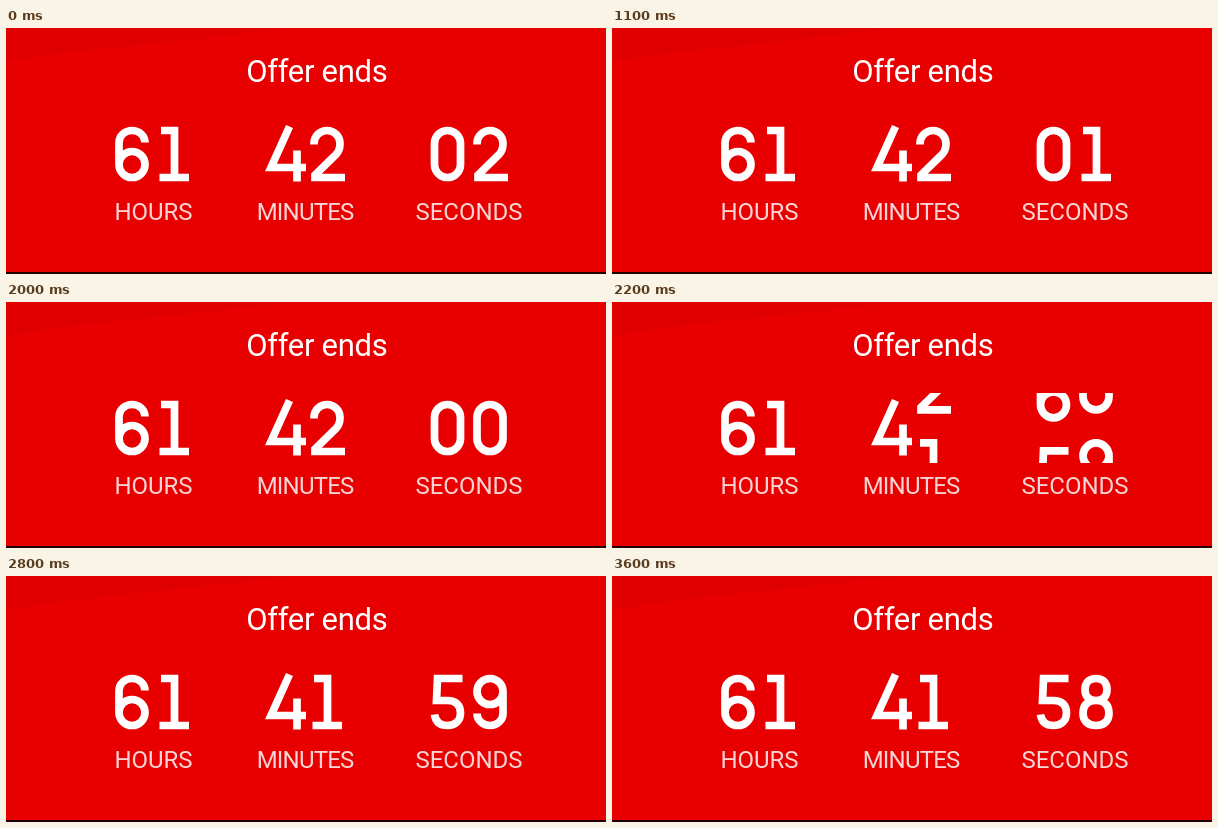
An HTML page with a canvas that plays this animation: 600x246 px, repeating every 3.7 s.

```html
<!DOCTYPE html>
<html lang="en">
<head>
<meta charset="utf-8">
<title>Offer ends</title>
<style>
  html, body { margin: 0; width: 100%; height: 100%; overflow: hidden; background: #e80000; }
  canvas { display: block; }
</style>
</head>
<body>
<canvas id="stage" width="600" height="246" aria-label="Offer ends countdown"></canvas>
<script>
const ctx = document.getElementById('stage').getContext('2d');
const LOOP = 3700, STEP = 100;
const TOP = 98.5, PITCH = 80;

// Centre lines of the numerals, in a cell 34 wide and 55 high
const six = 'M30 16A13 12 0 0 0 4 16V38A13 13 0 0 0 30 38A13 13 0 0 0 4 38';
const digits = {
  0: 'M4 17A13 13 0 0 1 30 17V38A13 13 0 0 1 4 38Z',
  1: 'M4 4H17.5V51M2.5 51H32',
  2: 'M4 18V17A13 13 0 0 1 30 17C30 22 29 25 26 28L5 48.5V51H35',
  4: 'M23.5 0L5 41H40M31 24V55',
  5: 'M32 4H7L6 26H17C25 26 30 30 30 38.5C30 46 25 51 17 51C9 51 5 47 4 40',
  6: six,
  8: 'M17 4C9 4 6 9 6 15C6 21 9 26 17 26C25 26 28 21 28 15C28 9 25 4 17 4Z' +
     'M17 26C8 26 4 31 4 38.5C4 46 8 51 17 51C26 51 30 46 30 38.5C30 31 26 26 17 26Z'
};
const glyphs = {};
for (const d in digits) glyphs[d] = new Path2D(digits[d]);
glyphs[9] = new Path2D();
glyphs[9].addPath(glyphs[6], new DOMMatrix([-1, 0, 0, -1, 34, 55]));

function digit(d, x, y) {
  ctx.save();
  ctx.translate(x, y);
  ctx.stroke(glyphs[d]);
  ctx.restore();
}

// Each roll is [start, duration, from, to]
function reel(x, first, rolls, t) {
  let from = first, to = first, left = 0;
  for (const [start, length, a, b] of rolls) {
    if (t < start) break;
    from = a;
    to = b;
    left = Math.pow(1 - Math.min(1, (t - start) / length), 3);
  }
  digit(to, x, TOP + left * PITCH);
  if (left > 0) digit(from, x, TOP + (left - 1) * PITCH);
}

const fast = (start, from, to) => [start, 230, from, to];
const reels = [
  [109, 6, []],
  [151, 1, []],
  [260, 4, []],
  [304, 2, [fast(2150, 2, 1)]],
  [424.5, 0, [[2110, 540, 6, 5]]],
  [467, 2, [fast(150, 2, 1), fast(1150, 1, 0), fast(2150, 0, 9), fast(3150, 9, 8)]]
];

function label(text, x, y, size, color, spacing) {
  ctx.font = `400 ${size}px Roboto, sans-serif`;
  ctx.letterSpacing = spacing + 'px';
  ctx.fillStyle = color;
  ctx.fillText(text, x + spacing / 2, y);
}

function background() {
  ctx.fillStyle = '#e80000';
  ctx.fillRect(0, 0, 600, 246);
  ctx.fillStyle = '#e00000';
  ctx.beginPath();
  ctx.moveTo(0, 0);
  ctx.lineTo(290, 0);
  ctx.lineTo(50, 26);
  ctx.lineTo(0, 34);
  ctx.fill();
  ctx.fillStyle = '#200000';
  ctx.fillRect(0, 244, 600, 2);
}

function draw(t) {
  background();
  ctx.textAlign = 'center';
  label('Offer ends', 311, 54, 31, '#fff', -0.3);
  const pale = '#f8d4d4';
  label('HOURS', 147.5, 192, 24, pale, 0);
  label('MINUTES', 299.5, 192, 24, pale, -0.8);
  label('SECONDS', 463, 192, 24, pale, 0);

  ctx.save();
  ctx.beginPath();
  ctx.rect(90, 91, 430, 70);
  ctx.clip();
  ctx.strokeStyle = '#fff';
  ctx.lineWidth = 7.7;
  for (const [x, first, rolls] of reels) reel(x, first, rolls, t);
  ctx.restore();
}

const begin = performance.now();
function tick() {
  const t = (performance.now() - begin) % LOOP;
  draw(Math.floor(t / STEP) * STEP);
  requestAnimationFrame(tick);
}
tick();
</script>
</body>
</html>
```
